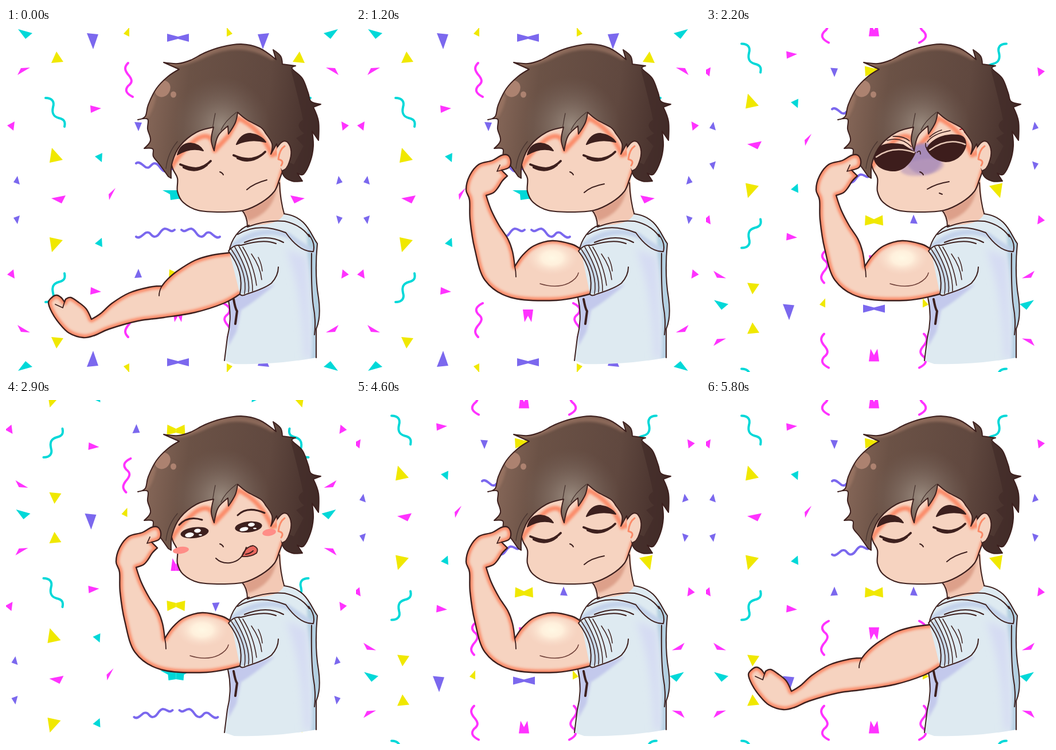
These frames come from a looping animation (600x600 px, 6 s). An HTML page:

```html
<!DOCTYPE html>
<html lang="en">
<head>
<meta charset="utf-8">
<title>Flexing arm</title>
<style>
html,body{margin:0;width:100%;height:100%;overflow:hidden;background:#fff}
svg{display:block;width:100vw;height:100vh}
</style>
</head>
<body>
<svg id="stage" viewBox="0 0 600 600" fill="none" stroke-linecap="round" stroke-linejoin="round"></svg>
<script>
const INK = '#3d201e', CYAN = '#00d8d8', PINK = '#ff33ff', PURPLE = '#7b68ee', YELLOW = '#f0e800';
const SKIN = '#f6d3c0', GLOW = '#fb8b69';
const stage = document.getElementById('stage');
const $ = id => document.getElementById(id);
const clamp = v => Math.max(0, Math.min(1, v));

// Smooth curve through points; a point listed in sharp keeps its corner.
function curve(pts, sharp, closed) {
  const n = pts.length, at = i => closed ? pts[(i + n) % n] : pts[Math.max(0, Math.min(n - 1, i))];
  const handle = (i, s) => {
    const p = at(i);
    if (sharp.has((i + n) % n)) return p;
    const a = at(i - 1), b = at(i + 1);
    return [p[0] + s * (b[0] - a[0]) / 6, p[1] + s * (b[1] - a[1]) / 6];
  };
  let d = 'M' + pts[0];
  for (let i = 0; i < n - (closed ? 0 : 1); i++) d += `C${handle(i, 1)} ${handle(i + 1, -1)} ${at(i + 1)}`;
  return d + (closed ? 'Z' : '');
}
const points = s => s.trim().split(/\s+/).map(p => p.replace('!', '').split(',').map(Number));
const corners = s => new Set(s.trim().split(/\s+/).flatMap((p, i) => p.endsWith('!') ? [i] : []));
const outline = s => curve(points(s), corners(s), true);
const line = (d, w = 2, c = INK, more = '') => `<path d="${d}" stroke="${c}" stroke-width="${w}" ${more}/>`;
const fill = (d, c, more = '') => `<path d="${d}" fill="${c}" ${more}/>`;
const oval = (x, y, rx, ry, c, turn = 0, more = '') =>
  `<ellipse cx="${x}" cy="${y}" rx="${rx}" ry="${ry}" fill="${c}" transform="rotate(${turn} ${x} ${y})" ${more}/>`;

// Confetti: one quarter, mirrored down and then across.
const poly = (c, p) => `<polygon fill="${c}" points="${p}"/>`;
const quarter =
  poly(CYAN, '21,2 46,9 34,19') + poly(PINK, '42,69 26,70 20,82') + poly(YELLOW, '88,41 100,59 79,61') +
  poly(PINK, '15,163 2,170 13,179') + poly(PINK, '147,135 166,140 148,148') +
  poly(YELLOW, '80,209 99,230 76,235') + poly(CYAN, '168,218 155,224 167,234') +
  poly(PURPLE, '20,258 13,269 24,273') + poly(PURPLE, '141,9 161,11 152,37') +
  poly(YELLOW, '215,-1 205,10 215,15') + poly(PURPLE, '224,164 237,165 231,180') +
  poly(PURPLE, '281,10 300,15 300,19 281,24') + poly(PINK, '291,109 294,87 300,98 300,109') +
  poly(YELLOW, '285,179 300,172 300,165 284,161') +
  line('M69 122C80 122 85 128 82 138C79 151 85 155 92 157C101 159 104 163 102 172', 4, CYAN) +
  line('M213 61C206 68 207 73 212 80C221 90 221 95 213 101C207 108 209 114 221 120', 4, PINK) +
  line('M227 236C232 231 239 240 244 243C252 246 253 236 259 236C268 236 269 249 277 250C285 250 287 242 294 248', 4, PURPLE);
const singles = poly(PINK, '104,292 79,297 97,306') + poly(PINK, '191,279 179,290 180,300') +
  poly(CYAN, '273,283 300,283 300,298 287,300 286,290');
const half = `<g>${quarter}<g transform="matrix(1 0 0 -1 0 600)">${quarter}</g>${singles}</g>`;
const tile = `<g id="tile"><rect x="-20" y="-6" width="640" height="606" fill="#fff"/>${half}<g transform="matrix(-1 0 0 1 600 0)">${half}</g></g>`;

const hair = outline(`283,259! 268,238 257,224 256,211 241,210! 252,196 247,176 247,159 230,160! 243,154 248,134 262,106
  282,85 302,72! 275,60! 300,62 322,56 347,43 376,33 410,28 442,35 471,55! 466,38! 479,49 482,63! 505,66! 499,71 517,88
  527,113 532,128 549,133! 536,138! 545,163 545,196! 534,180! 536,206 531,232 519,255 508,253! 517,267! 499,267 484,257
  478,230 472,202! 462,220! 464,202 453,184! 444,173 420,160 404,147! 400,165 388,185! 387,171! 370,188 363,214!
  358,195 362,173! 332,182 304,205 290,234 288,262!`);
const face = outline(`287,215 290,243 299,262 299,285 309,304 335,318 375,321 415,318 446,304 468,285 477,264 483,248!
  495,236 498,215 491,198 480,198 465,150 420,125 360,130 305,165`);
const shirt = 'M424 344C406 350 393 368 389 390L387 470Q395 505 386 540L381 580L398 586Q470 588 540 575L541 525Q550 505 545 470Q538 430 543 376C531 360 525 329 485 324Q476 345 424 344Z';
const sleeve = 'M388 389Q397 378 410 379L440 374Q470 385 475 416Q472 440 461 446Q436 455 418 466Q412 469 408 464Q416 425 388 389Z';

// Arm contours share one order: biceps, forearm, hand, lower edge, thumb fold.
const armKeys = [
  `390,392 360,396 330,405 300,423 282,438 272,450 250,452 215,462 185,480 165,498 149,508 140,490 126,478 113,470
   104,473 102,478 96,470 88,466 80,470 74,479 80,496 92,514 110,532 135,540 155,536 180,525 230,511 275,505 330,496
   380,480 408,464 99,488 86,482`,
  `392,388 376,380 345,376 315,384 291,399 273,413 252,393 222,374 190,365 167,361 151,354 154,335 156,317 157,303
   152,295 143,293 145,283 139,276 128,274 120,281 117,296 108,306 108,330 113,360 132,376 160,402 195,432 235,460 290,473
   365,474 408,464 135,303 131,291`,
  `392,386 376,377 342,371 310,380 290,397 277,416 273,390 265,368 250,345 236,318 227,292 240,287 248,278 255,267
   264,258 254,248 267,243 270,232 265,222 254,222 238,231 214,238 198,258 192,282 198,300 199,335 207,385 225,440 270,470
   350,475 408,464 246,250 251,239`
].map(points);
const armSharp = new Set([0, 5, 10, 14, 15, 30]);
const folds = [[267, 467], [254, 440], [279, 434]];
const elbow = [262, 440];
const lerp = (a, b, k) => a + (b - a) * k;

function swing(a, b, k) {
  const polar = p => [Math.hypot(p[0] - elbow[0], p[1] - elbow[1]), Math.atan2(p[1] - elbow[1], p[0] - elbow[0])];
  const [ra, ta] = polar(a), [rb, tb] = polar(b);
  const turn = Math.atan2(Math.sin(tb - ta), Math.cos(tb - ta));
  const r = lerp(ra, rb, k), t = ta + turn * k;
  return [elbow[0] + r * Math.cos(t), elbow[1] + r * Math.sin(t)];
}

stage.innerHTML = `
<defs>
  ${tile}
  <filter id="soft" x="-20%" y="-20%" width="140%" height="140%"><feGaussianBlur stdDeviation="2"/></filter>
  <filter id="haze" x="-50%" y="-50%" width="200%" height="200%"><feGaussianBlur stdDeviation="7"/></filter>
  <linearGradient id="hairTone" gradientUnits="userSpaceOnUse" x1="235" y1="130" x2="545" y2="170">
    <stop offset="0" stop-color="#8a6a5b"/><stop offset=".25" stop-color="#6b5246"/>
    <stop offset=".7" stop-color="#60483f"/><stop offset="1" stop-color="#432d29"/></linearGradient>
  <radialGradient id="hairLight" gradientUnits="userSpaceOnUse" cx="375" cy="170" r="85">
    <stop offset="0" stop-color="#9b8c80"/><stop offset="1" stop-color="#75635a" stop-opacity="0"/></radialGradient>
  <radialGradient id="shine"><stop offset="0" stop-color="#fff8e4"/><stop offset=".4" stop-color="#fff0dc"/>
    <stop offset="1" stop-color="#f9dccb" stop-opacity="0"/></radialGradient>
  <clipPath id="hairClip"><path d="${hair}"/></clipPath>
  <clipPath id="faceClip"><path d="${face}"/></clipPath>
  <clipPath id="shirtClip"><path d="${shirt}"/></clipPath>
  <clipPath id="armClip"><path id="armClipPath"/></clipPath>
</defs>
<rect width="600" height="600" fill="#fff"/>
<use id="upper" href="#tile"/><use id="lower" href="#tile"/>

${fill('M410 310Q421 325 421 347Q455 355 486 328Q479 300 479 262Z', '#f3c9b5')}
${fill('M412 318Q450 307 472 280Q466 322 422 337Z', '#dda08a', 'filter="url(#soft)"')}
${line('M411 317Q421 328 421 346M477 270Q478 300 486 327')}

${fill(shirt, '#deeaf1')}
<g clip-path="url(#shirtClip)">
  ${fill('M389 465Q425 462 470 447Q430 480 410 492L402 530L388 555Z', '#c3c9ec', 'filter="url(#soft)"')}
  ${fill('M525 350L550 370L552 580L532 580Q538 480 526 400Z', '#b2cfe0', 'filter="url(#soft)"')}
  ${fill('M525 400Q528 480 533 575L520 577Q518 460 488 385Z', '#d5dbf3', 'filter="url(#haze)"')}
  ${line('M394 382Q440 344 493 362Q520 382 536 390', 9, '#c3d2ea', 'filter="url(#soft)"')}
</g>
${line('M541 575L541 525Q550 505 545 470Q538 430 543 376C531 360 525 329 485 324M424 344C406 350 393 368 389 390M387 470Q395 505 386 540L381 580')}
${line('M404 360Q440 338 488 357Q512 391 536 390Q540 375 528 360M421 347Q455 334 486 337Q516 344 529 364M416 374Q455 358 484 374', 2)}
${line('M533 393Q532 455 536 485Q541 510 538 535', 2)}
${line('M397 473Q400 490 403 494L400 516', 4)}

<g>
  <path id="arm" fill="${SKIN}"/>
  <g clip-path="url(#armClip)">
    <path id="armGlow" stroke="${GLOW}" stroke-width="11" filter="url(#soft)"/>
    <ellipse id="armShine" cx="342" cy="401" rx="45" ry="30" fill="url(#shine)"/>
  </g>
  <path id="armInk" stroke="${INK}" stroke-width="2.4"/>
  <path id="armFold" stroke="${INK}" stroke-width="1.8"/>
  <path id="muscle" d="M321 446Q350 455 371 445Q386 437 388 427" stroke="#6f4038" stroke-width="1.5"/>
</g>
${fill(sleeve, '#deeaf1')}
${fill('M408 464Q416 425 391 391L402 384Q427 430 427 459Z', '#c8d8e8')}
${line('M388 389Q397 377 410 379Q450 367 471 376M388 389Q416 425 408 464Q411 469 420 464Q452 454 463 445Q475 432 475 417')}
${line('M393 386Q422 428 416 464M399 382Q427 429 423 461M406 380Q431 423 430 459M413 382Q432 412 437 449M428 394Q444 417 446 439M440 400Q446 412 447 424', 1.5)}

${fill(face, SKIN)}
<g clip-path="url(#faceClip)">
  ${line('M288 245Q300 220 332 194Q361 177 364 214L388 188L405 157Q445 176 464 222M480 200L470 220M483 248L474 278', 8, GLOW, 'filter="url(#soft)"')}
</g>
${line(face, 2.2)}
${line('M486 207Q495 219 486 235', 3, GLOW)}

<g id="shut">
  ${fill('M299 221Q304 201 322 201Q337 202 344 214Q322 207 299 221Z', INK, `stroke="${INK}" stroke-width="2"`)}
  ${fill('M402 203Q410 184 426 184Q445 187 453 199Q426 192 402 203Z', INK, `stroke="${INK}" stroke-width="2"`)}
  ${line('M304 238Q318 244 331 245Q347 243 357 232', 4)}${line('M310 243Q332 254 350 239', 4)}
  ${line('M397 222Q415 230 429 228Q444 225 452 216', 4)}${line('M404 227Q425 237 445 222', 4)}
</g>
<path id="frown" stroke="${INK}" stroke-width="2"/>

<g id="angry">
  ${oval(380, 228, 31, 27, '#a78bb8', 0, 'filter="url(#soft)"')}
  ${oval(377, 243, 38, 14, '#b99abb', -8, 'opacity=".65" filter="url(#soft)"')}
  <g id="angryEyes">
    ${fill('M292 221C296 201 322 198 344 203L366 217C357 238 343 251 325 250C304 249 291 237 292 221Z', '#3d1d1c')}
    ${fill('M384 211C394 191 418 183 440 186Q455 188 454 205C450 222 435 234 418 234Q395 232 384 211Z', '#3d1d1c')}
    ${line('M297 225Q326 204 363 217M390 213Q422 190 452 203', 2.5, '#e5c6b5')}
  </g>
  ${line('M316 196Q340 189 358 207M326 189Q344 188 355 197M386 199Q396 184 426 179M390 190Q400 181 411 178M368 217Q374 211 374 220M383 201Q382 210 388 211', 1.6)}
  ${line('M386 281Q403 271 424 268M407 288L412 290', 2)}
  ${line('M442 170Q450 172 448 164M454 163Q453 171 461 169M443 177Q451 174 451 182M456 183Q454 175 461 175M451 172L456 174', 2, '#c9252d')}
</g>

<g id="cute">
  ${line('M302 218Q317 201 342 209M404 201Q421 184 451 197', 3)}
  <g id="cuteEyes">
    ${oval(329, 234, 25, 14, INK, -14)}${oval(423, 219, 24, 14, INK, -12)}
    ${oval(320, 240, 8, 6, '#fff', -25)}${oval(334, 229, 6, 5, '#fff', -20)}
    ${oval(415, 225, 8, 5, '#fff', -25)}${oval(428, 213, 6, 5, '#fff', -20)}
    ${oval(339, 240, 3, 2, '#fff')}${oval(434, 223, 3, 2, '#fff')}
  </g>
  ${oval(305, 262, 14, 6, '#ff8d87', -8)}${oval(459, 231, 12, 6, '#ff8d87', -8)}
  ${fill('M411 273Q417 256 431 254Q442 258 437 267Q427 274 411 273Z', '#e9685f', `stroke="${INK}" stroke-width="1.8"`)}
  ${line('M366 276Q376 286 391 284Q412 281 419 257M418 269Q426 268 431 263', 2)}
</g>
${line('M373 251Q377 252 379 256', 2)}

${fill(hair, 'url(#hairTone)')}
<g clip-path="url(#hairClip)">
  <rect x="280" y="80" width="190" height="170" fill="url(#hairLight)"/>
  ${line('M277 60Q305 67 348 46Q408 18 465 51M235 160Q249 155 257 121', 9, '#a27a68', 'opacity=".65" filter="url(#soft)"')}
  ${fill('M497 73Q512 130 518 160Q502 170 520 184L506 192L519 206L502 238L476 225L480 270L552 270L552 85Z', '#422c29', 'opacity=".7"')}
  ${oval(273, 106, 13, 15, '#ac8270', 35)}${oval(292, 116, 5, 5.5, '#ac8270')}
  ${line('M365 149Q361 167 358 195M402 147Q382 162 375 178M279 245Q282 218 299 198', 1.3, '#493530')}
</g>
${line(hair, 2)}
${fill('M472 213Q478 194 489 198Q501 207 495 232Q491 248 482 249Q473 235 472 213Z', SKIN)}
${line('M474 207Q483 193 491 199Q502 212 494 234Q490 247 482 249', 2)}
${line('M486 206Q477 212 475 229Q486 231 480 240', 3, GLOW)}
<path id="sparkle" stroke="#fff" stroke-width="2"/>
<use id="fist" href="#forearm"/>`;

// The fist passes in front of the hair, so the arm and sleeve go on top of the head.
const armGroup = $('arm').parentNode;
const sleeveParts = [];
for (let n = armGroup.nextElementSibling, i = 0; i < 4; i++, n = n.nextElementSibling) sleeveParts.push(n);
$('fist').remove();
stage.append(armGroup, ...sleeveParts);

function drawArm(ms) {
  const first = ms <= 500, from = first ? 0 : 1;
  const k = first ? ms / 500 : (ms - 500) / 200;
  const a = armKeys[from], b = armKeys[from + 1];
  const pts = a.map((p, i) => i < 6 || (i > 27 && i < 31)
    ? [lerp(p[0], b[i][0], k), lerp(p[1], b[i][1], k)] : swing(p, b[i], k));
  const edge = pts.slice(0, 31), d = curve(edge, armSharp, false);
  for (const id of ['arm', 'armClipPath', 'armGlow', 'armInk']) $(id).setAttribute('d', d);
  const f = [0, 1].map(j => lerp(folds[from][j], folds[from + 1][j], k));
  $('armFold').setAttribute('d', `M${pts[15]}L${pts[31]}L${pts[32]}M${pts[5]}Q${f[0]} ${(f[1] + pts[5][1]) / 2} ${f}`);
  $('armShine').setAttribute('opacity', first ? 0 : k);
  $('muscle').setAttribute('opacity', clamp((ms - 300) / 300));
}

function showFace(id, amount) {
  $(id).setAttribute('opacity', amount ? 1 : 0);
  $(id + 'Eyes').setAttribute('transform', `translate(0 ${226 * (1 - amount)}) scale(1 ${amount})`);
}

function draw(time) {
  const t = Math.floor(time / 100) * 100;
  const step = Math.floor(t / 200) % 6;
  const x = -2 * step + 0.12 * step * step, y = 94.5 * step;
  $('upper').setAttribute('transform', `translate(${x} ${y - 567})`);
  $('lower').setAttribute('transform', `translate(${x} ${y})`);

  const flex = Math.max(0, Math.min(700, t < 4000 ? t : 5400 - t));
  drawArm(flex);

  const angry = t < 2300 ? clamp((t - 1400) / 300) : clamp((2700 - t) / 400);
  const cute = t < 4000 ? clamp((t - 2700) / 300) : clamp((4400 - t) / 200);
  showFace('angry', angry);
  showFace('cute', cute);
  const shut = !angry && !cute;
  $('shut').setAttribute('opacity', shut ? 1 : 0);
  $('frown').setAttribute('opacity', shut ? 1 : 0);
  const m = clamp(flex / 400);
  $('frown').setAttribute('d', `M${420 - 22 * m} ${282 + 5 * m}q12 -11 35 ${-17 + 2 * m}`);

  const s = t >= 3400 && t < 3800 ? [3, 4, 5, 3][(t - 3400) / 100] : 0;
  $('sparkle').setAttribute('d', s ? `M473 ${178 - s - 1}V${178 + s + 1}M${473 - s} 177H${473 + s}` : '');
}

const start = performance.now();
function tick() {
  draw((performance.now() - start) % 6000);
  requestAnimationFrame(tick);
}
tick();
</script>
</body>
</html>
```
